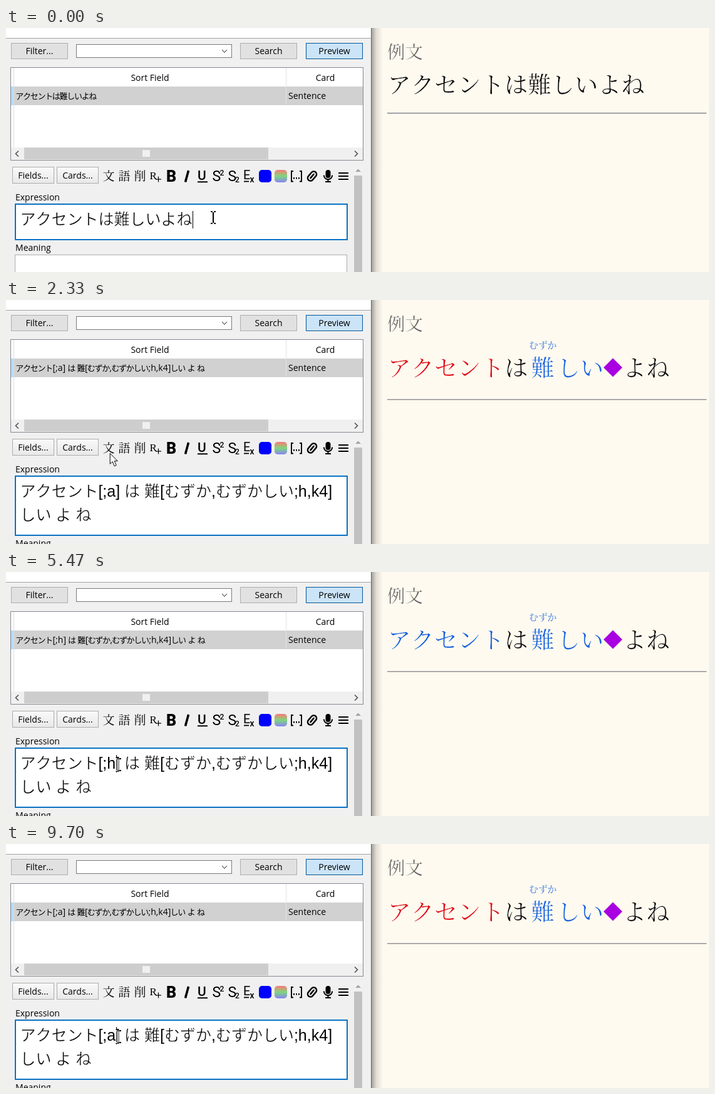
Recreate the animation shown at these times as an HTML page with a canvas. Size 1123x392 px, loop 9930 ms.

```html
<!DOCTYPE html>
<html lang="ja">
<head>
<meta charset="utf-8">
<style>
  html, body { margin: 0; width: 100%; height: 100%; overflow: hidden; background: #fffaf0; }
  canvas { display: block; }
</style>
</head>
<body>
<canvas id="stage" width="1123" height="392"></canvas>
<script>
const ctx = document.getElementById('stage').getContext('2d');
const LOOP = 9930;
const UI = '14px "Open Sans", "Noto Sans", sans-serif';
const MINCHO = '"Noto Serif CJK JP", "Noto Sans CJK JP", serif';
const GOTHIC = '"Noto Sans CJK JP", sans-serif';
const ARIAL = '25px "Liberation Sans", sans-serif';
const PLAIN = 'アクセントは難しいよね';
const BLUE = '#0a5be0';
const CREAM = '#fffaf0';

// Each entry holds from its time until the next one.
const FIELD = [[0, null], [1800, 'a'], [4330, ''], [4430, 'h'], [5800, ''], [5900, 'o'], [7500, ''], [7570, 'a']];
const SORT = [[0, null], [1800, 'a'], [5070, 'h'], [6530, 'o'], [8200, 'a']];
const PREVIEW = [[0, 'plain'], [1830, '#e0000c'], [5070, BLUE], [6530, 'blank'], [6570, '#087832'], [8200, '#e0000c']];
const CARET = [[0, 1], [100, 0], [600, 1], [1130, 0], [1800, 1], [2300, 0], [2830, 1], [3630, 0], [4200, 1],
  [5000, 0], [5470, 1], [6430, 0], [6970, 1], [7430, 0], [7500, 1], [8100, 0], [8600, 1], [9200, 0], [9700, 1]];

function valueAt(track, t) {
  let value = track[0][1];
  for (const [start, v] of track) if (t >= start) value = v;
  return value;
}

function rect(x, y, w, h, fill, border, line = 1) {
  ctx.fillStyle = fill;
  ctx.fillRect(x, y, w, h);
  if (!border) return;
  ctx.strokeStyle = border;
  ctx.lineWidth = line;
  ctx.strokeRect(x + line / 2, y + line / 2, w - line, h - line);
}

function rounded(x, y, w, h, r, fill) {
  ctx.beginPath();
  ctx.roundRect(x, y, w, h, r);
  ctx.fillStyle = fill;
  ctx.fill();
}

function text(str, x, y, font = UI, fill = '#000', align = 'left') {
  ctx.font = font;
  ctx.fillStyle = fill;
  ctx.textAlign = align;
  ctx.fillText(str, x, y);
}

// Gives a lighter weight by trimming the outline with the paper colour.
function lightText(str, x, y, font, fill, paper, trim) {
  text(str, x, y, font, fill);
  ctx.strokeStyle = paper;
  ctx.lineWidth = trim;
  ctx.strokeText(str, x, y);
}

function path(points, stroke, width) {
  ctx.beginPath();
  points.forEach(([x, y]) => ctx.lineTo(x, y));
  ctx.strokeStyle = stroke;
  ctx.lineWidth = width;
  ctx.stroke();
}

function polygon(points, fill) {
  ctx.beginPath();
  points.forEach(([x, y]) => ctx.lineTo(x, y));
  ctx.closePath();
  ctx.fillStyle = fill;
  ctx.fill();
}

// Sets Japanese and Latin runs in their own fonts, returns the end position.
function mixed(str, x, y, japanese, latin, { tracking = 0, paper = '#fff', trim = 0 }) {
  for (const run of str.match(/[\x20-\x7e]+|[^\x20-\x7e]+/g)) {
    const isLatin = run.charCodeAt(0) < 128;
    ctx.letterSpacing = isLatin ? '0px' : tracking + 'px';
    if (isLatin) text(run, x, y, latin);
    else if (trim) lightText(run, x, y, japanese, '#000', paper, trim);
    else text(run, x + tracking / 2, y, japanese);
    x += ctx.measureText(run).width;
  }
  ctx.letterSpacing = '0px';
  return x;
}

function gradient(y0, y1, ...colors) {
  const g = ctx.createLinearGradient(0, y0, 0, y1);
  colors.forEach((c, i) => g.addColorStop(i / (colors.length - 1), c));
  return g;
}

function button(label, x, y, w, h, fill = '#e1e1e1', border = '#adadad') {
  rect(x, y, w, h, fill, border);
  text(label, x + w / 2, y + h / 2 + 5, UI, '#000', 'center');
}

function drawTable(sort) {
  rect(7, 63, 564, 150, '#fff', '#828790');
  rect(8, 94, 4, 30, '#b5dcf5');
  rect(13, 94, 557, 30, '#d1d1d1');
  rect(12, 64, 1, 128, '#dedede');
  rect(447, 64, 1, 60, '#e3e3e3');
  text('Sort Field', 230, 85, UI, '#000', 'center');
  text('Card', 510, 85, UI, '#000', 'center');
  text('Sentence', 451, 114);
  const row = sort === null ? PLAIN : `アクセント[;${sort}] は 難[むずか,むずかしい;h,k4]しい よ ね`;
  mixed(row, 16, 114, '13px ' + GOTHIC, UI, { tracking: -1.3 });
  rect(8, 192, 562, 20, '#f0f0f0');
  rect(29, 192, 390, 19, '#cdcdcd');
  rect(218, 196, 12, 11, '#f0f0f0');
  path([[20, 197.5], [15.5, 202], [20, 206.5]], '#505050', 1.6);
  path([[557, 197.5], [561.5, 202], [557, 206.5]], '#505050', 1.6);
}

function drawToolbar() {
  const face = gradient(223, 250, '#fafafa', '#e8e8e8');
  button('Fields...', 10, 223, 67, 27, face);
  button('Cards...', 81, 223, 67, 27, face);
  [...'文語削'].forEach((c, i) => text(c, 154.5 + i * 25, 245, '500 19px ' + MINCHO));
  text('R', 229.5, 243, '17px "Liberation Serif", serif');
  path([[239, 243], [248, 243]], '#000', 1.2);
  path([[243.5, 238.5], [243.5, 247.5]], '#000', 1.2);
  const sans = 'px Roboto, "Liberation Sans", sans-serif';
  text('B', 256, 247, '900 25' + sans);
  path([[291.5, 229], [286.5, 247.5]], '#000', 3.6);
  text('U', 306, 244, '500 21' + sans);
  path([[306, 247.3], [322, 247.3]], '#000', 2);
  text('S', 329.5, 246, '23' + sans);
  text('2', 341.5, 237, '500 12' + sans);
  text('S', 354.5, 246, '23' + sans);
  text('2', 366, 248, '500 12' + sans);
  text('E', 379, 243, '20' + sans);
  path([[380, 246.5], [388, 246.5]], '#000', 1.8);
  text('x', 389.5, 248, '500 14' + sans);
  rounded(404, 228, 20, 20, 5, '#00f');
  rounded(429, 228, 20, 20, 5, gradient(228, 248, '#fb7979', '#7fd77c', '#8785f5'));
  for (const s of [-1, 1]) {
    path([[464 + s * 5, 230], [464 + s * 8, 230], [464 + s * 8, 246.5], [464 + s * 5, 246.5]], '#000', 1.9);
  }
  for (const x of [459, 463, 467]) rect(x, 240, 2, 2.5, '#000');
  drawClip();
  drawMic();
  for (const y of [232, 237, 242]) rect(531, y, 16, 2, '#000');
}

function drawClip() {
  ctx.save();
  ctx.translate(489, 238);
  ctx.rotate(Math.PI / 4.5);
  ctx.lineCap = 'round';
  ctx.strokeStyle = '#000';
  ctx.lineWidth = 2.5;
  ctx.beginPath();
  ctx.roundRect(-4.5, -8.5, 9, 17, 4.5);
  ctx.stroke();
  path([[0, -4], [0, 4]], '#000', 2.6);
  ctx.restore();
}

function drawMic() {
  rounded(510.5, 228, 8, 13, 4, '#000');
  ctx.beginPath();
  ctx.arc(514.5, 236.5, 6.7, 0, Math.PI);
  ctx.strokeStyle = '#000';
  ctx.lineWidth = 2;
  ctx.stroke();
  rect(513.5, 243, 2, 4, '#000');
  rect(510, 246, 9, 2, '#000');
}

function drawEditor(t) {
  const value = valueAt(FIELD, t);
  const grow = value === null ? 0 : 38;
  const left = 22.4;
  const set = (str, y) => mixed(str, left, y, '300 25px ' + GOTHIC, ARIAL, { trim: .5 });
  text('Expression', 15, 277);
  rect(14, 282, 532, 59 + grow, '#fff', '#0a72c4', 2);
  let caretX, caretY = 294;
  if (value === null) {
    caretX = set(PLAIN, 316);
  } else {
    const wraps = value === '';
    set(`アクセント[;${value}] は 難[むずか,むずかしい;h,k4]${wraps ? 'し' : ''}`, 316);
    caretX = set((wraps ? '' : 'し') + 'い よ ね', 354);
    if (t < 3130) {
      caretY = 332;
    } else {
      ctx.font = ARIAL;
      caretX = left + 125 + ctx.measureText('[;' + value).width;
    }
  }
  if (valueAt(CARET, t)) rect(Math.floor(caretX + 1), caretY, 1, 28, '#000');
  text('Meaning', 15, 358 + grow);
  rect(14, 364 + grow, 531, 60, '#fff', '#adadad');
}

function drawWindow(t) {
  rect(0, 0, 583, 392, '#f0f0f0');
  rect(0, 0, 583, 16, '#fff');
  rect(0, 16, 583, 1, '#a3a3a3');
  rect(583, 0, 1, 392, '#686868');
  button('Filter...', 8, 24, 91, 26);
  rect(112, 26, 249, 22, '#fff', '#7a7a7a');
  path([[345, 35], [349, 39.3], [353, 35]], '#444', 1.1);
  button('Search', 374, 24, 91, 26);
  button('Preview', 479, 24, 91, 26, '#cce4f7', '#005499');
  drawTable(valueAt(SORT, t));
  drawToolbar();
  rect(555, 222, 15, 170, '#f1f1f1');
  rect(556, 237, 13, 155, '#c1c1c1');
  polygon([[558, 231], [562.5, 226.5], [567, 231]], '#a3a3a3');
  drawEditor(t);
}

function drawPreview(mode) {
  rect(584, 0, 539, 392, CREAM);
  const shade = ctx.createLinearGradient(584, 0, 602, 0);
  shade.addColorStop(0, 'rgba(0,0,0,.36)');
  shade.addColorStop(.4, 'rgba(0,0,0,.12)');
  shade.addColorStop(1, 'rgba(0,0,0,0)');
  rect(584, 0, 18, 392, shade);
  const mincho = (str, x, y, size, fill = '#000') =>
    lightText(str, x, y, `300 ${size}px ${MINCHO}`, fill, CREAM, size / 90);
  mincho('例文', 609, 49, 28.5, '#555');
  const plain = mode === 'plain';
  const ruleY = plain ? 136 : 159;
  rect(609, ruleY, 510, 1, plain ? '#8d8b91' : '#a3a1a3');
  rect(609, ruleY + 1, 510, 1, plain ? '#bbb9bd' : '#b4b2b2');
  const size = 37.33;
  if (plain) mincho(PLAIN, 609.5, 105, size);
  if (plain || mode === 'blank') return;
  const base = 122.5;
  mincho('アクセント', 609.5, base, size, mode);
  mincho('は', 796.5, base, size);
  mincho('むずか', 835, 78, size * .4, BLUE);
  mincho('難', 838.5, base, size, BLUE);
  mincho('しい', 880, base, size, BLUE);
  polygon([[969.5, 93.5], [984.5, 108.5], [969.5, 123.5], [954.5, 108.5]], '#a800e0');
  mincho('よね', 985.5, base, size);
}

function drawArrow(x, y) {
  ctx.save();
  ctx.translate(x + .5, y + .5);
  polygon([[0, 0], [0, 17], [4, 13.3], [7, 20.5], [10, 19.2], [7, 12.3], [12, 12.3]], '#fff');
  ctx.strokeStyle = '#000';
  ctx.lineWidth = 1;
  ctx.stroke();
  ctx.restore();
}

// The text pointer inverts whatever lies below it.
function drawBeam(x, y) {
  x = Math.round(x);
  y = Math.round(y);
  ctx.save();
  ctx.globalCompositeOperation = 'difference';
  rect(x, y - 8, 2, 17, '#fff');
  for (const edge of [y - 10, y + 9]) {
    rect(x - 3, edge, 3, 2, '#fff');
    rect(x + 2, edge, 3, 2, '#fff');
  }
  ctx.restore();
}

function glide(t, start, end, from, to) {
  const p = Math.min(1, Math.max(0, (t - start) / (end - start)));
  const ease = p * p * (3 - 2 * p);
  return from.map((v, i) => v + (to[i] - v) * ease);
}

function drawPointer(t) {
  const [x, y] = t < 1800
    ? glide(t, 500, 1330, [330, 304], [163, 233])
    : glide(t, 2140, 2870, [163, 233], [179, 309]);
  (y > 282 ? drawBeam : drawArrow)(x, y);
}

function frame(now) {
  const t = now % LOOP;
  drawPreview(valueAt(PREVIEW, t));
  drawWindow(t);
  drawPointer(t);
  requestAnimationFrame(frame);
}
requestAnimationFrame(frame);
</script>
</body>
</html>
```
